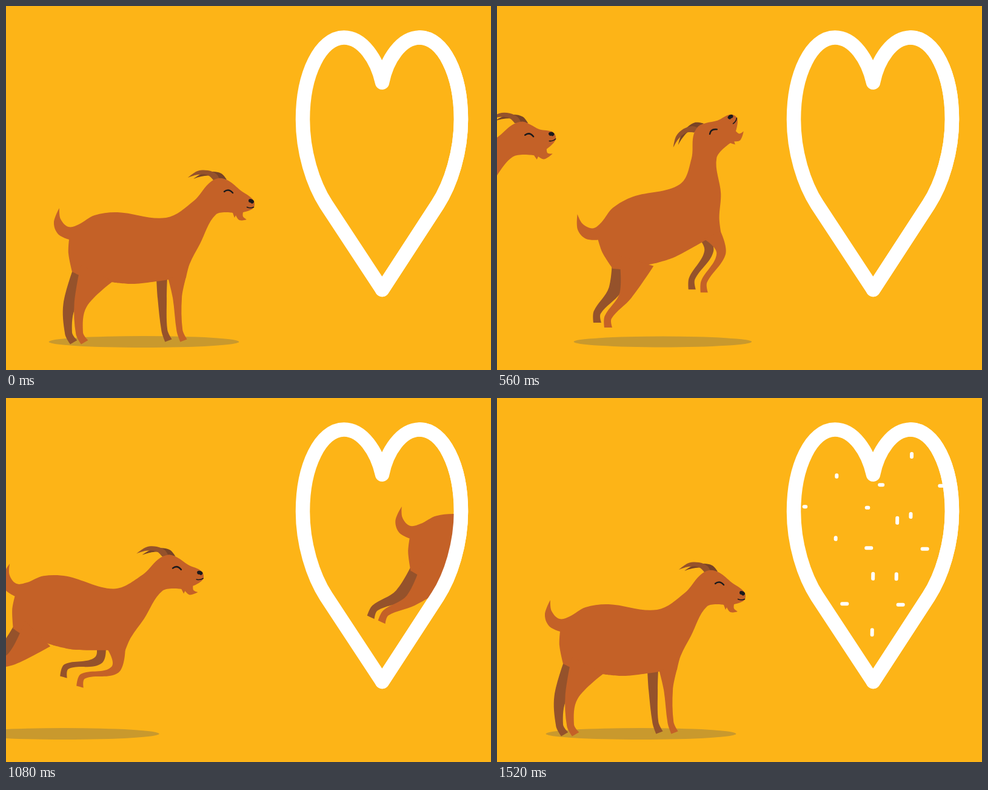
An HTML page with a canvas for the animation above (1560 ms loop, 800 by 600 pixels).

```html
<!DOCTYPE html>
<html lang="en">
<head>
<meta charset="utf-8">
<title>Goat leaping through a heart</title>
<style>
html, body { margin: 0; width: 100%; height: 100%; overflow: hidden; background: #fdb417; }
canvas { display: block; }
</style>
</head>
<body>
<canvas id="stage" width="800" height="600"></canvas>
<script>
const ctx = document.getElementById('stage').getContext('2d');
const LOOP = 1560, STEP = 40;
const COAT = '#c46127', SHADE = '#95522b', HORN = '#784326', INK = '#1b1a1c';

const lerp = (a, b, u) => a + (b - a) * u;
const clamp = u => Math.max(0, Math.min(1, u));
const ramp = (v, from, to) => {
  const u = clamp((v - from) / (to - from));
  return u * u * (3 - 2 * u);
};
// Half a cosine swing: 0 at rest, 2 after the given period
const swing = (t, period) => 1 - Math.cos(Math.PI * t / period);

// "x,y" is a smooth point, "x,y!" a corner
const points = text => text.trim().split(/\s+/).map(s => {
  const [x, y] = s.replace('!', '').split(',').map(Number);
  return { x, y, corner: s.endsWith('!') };
});

// The goat at rest; every other pose is this one bent
const torso = points(`88,333! 90,351 103,364 120,360 146,345 184,340 264,349 310,321 334,293
  350,284 367,288 387,304 408,320 408,333 391,340! 391,347 397,352! 385,353 379,345! 377,349!
  374,341! 346,344 320,392 303,425 297,448! 268,451! 212,458 180,456! 127,447! 109,438!
  103,408 104,385! 86,376 79,357`);
const farHorn = points('309,285! 322,277 340,273 355,276 364,286! 348,287! 338,280 322,281');
const nearHorn = points('300,283! 316,272 333,271 347,277 353,287! 342,287! 333,279 316,278');
const eyelid = points('360,306 367,300 374,308');
const nostril = points('403,321 405,321 406,322.5');
const mouth = points('397.5,331.5 403,334 408.5,331.5');
const [, eye] = eyelid, [nose] = nostril;

const legs = {
  front: { hip: { x: 282, y: 447 }, bones: [34, 54, 18], widths: [30, 15, 10, 12], farTop: 18 },
  hind: { hip: { x: 150, y: 440 }, bones: [60, 46, 17], widths: [60, 21, 12, 13], farTop: 45 }
};
// Thigh, shin and hoof angles, then the shift of the far leg
const stances = {
  stand: { front: [89, 86, 68, -25, 0], hind: [117, 92, 60, -18, 0] },
  run: { front: [85, 160, 97, -27, -16], hind: [127, 152, 110, -16, -10] },
  leap: { front: [86, 143, 111, -20, -5], hind: [129, 150, 111, -18, -8] }
};

// Negative times glide in to a landing, positive ones rear up and leap away
function motion(time) {
  if (time < 0) {
    const s = Math.max(0, -40 - time), x = -220 * swing(s, 1450);
    return {
      x, y: -75 * swing(s, 1200),
      body: .00033 * s, neck: -.00012 * s, head: -.00055 * s,
      stance: 'run', tuck: clamp(s / 160),
      shadowX: 237.5 + 1.53 * x, shadowR: 157
    };
  }
  const tuck = ramp(time, 0, 400), s = Math.max(0, time - 400);
  const leap = 307 * (Math.hypot(1, s / 260) - 1);
  return {
    x: 8 * tuck + leap, y: -18 * tuck - 65 * swing(s, 660),
    body: -.43 * tuck + .49 * (s / 680) ** 1.55, neck: -.22 * tuck, head: -.4 * tuck,
    stance: 'leap', tuck,
    shadowX: 227.5 + 2 * tuck + .82 * leap, shadowR: 157 - .19 * leap
  };
}

function turn(p, cx, cy, angle) {
  const c = Math.cos(angle), s = Math.sin(angle), x = p.x - cx, y = p.y - cy;
  return { x: cx + x * c - y * s, y: cy + x * s + y * c, corner: p.corner };
}

// Bends head, neck and body in turn; "at" makes a detail follow one spot rigidly
function bend(m, p, at = p) {
  p = turn(p, 352, 315, m.head * ramp(at.x, 345, 405));
  p = turn(p, 285, 385, m.neck * ramp(at.x - .7 * (at.y - 350), 240, 350));
  p = turn(p, 200, 400, m.body);
  return { x: p.x + m.x, y: p.y + m.y, corner: p.corner };
}

function trace(pts) {
  const path = new Path2D(), n = pts.length;
  const handle = (p, from, to, size) => {
    if (p.corner) return [p.x, p.y];
    const dx = to.x - from.x, dy = to.y - from.y, k = size / (Math.hypot(dx, dy) || 1);
    return [p.x + dx * k, p.y + dy * k];
  };
  path.moveTo(pts[0].x, pts[0].y);
  for (let i = 0; i < n; i++) {
    const a = pts[(i + n - 1) % n], b = pts[i], c = pts[(i + 1) % n], d = pts[(i + 2) % n];
    const size = Math.hypot(c.x - b.x, c.y - b.y) / 3;
    path.bezierCurveTo(...handle(b, a, c, size), ...handle(c, d, b, size), c.x, c.y);
  }
  path.closePath();
  return path;
}

function limb(hip, angles, bones, widths) {
  const left = [], right = [];
  let { x, y } = hip;
  widths.forEach((width, i) => {
    const before = angles[Math.max(0, i - 1)], after = angles[Math.min(i, bones.length - 1)];
    const across = (before + after) / 2 + Math.PI / 2;
    const dx = Math.cos(across) * width / 2, dy = Math.sin(across) * width / 2;
    const corner = i === 0 || i === bones.length;
    left.push({ x: x + dx, y: y + dy, corner });
    right.unshift({ x: x - dx, y: y - dy, corner });
    x += Math.cos(after) * bones[i];
    y += Math.sin(after) * bones[i];
  });
  return trace([...left, ...right]);
}

function fill(path, color) {
  ctx.fillStyle = color;
  ctx.fill(path);
}

function line(path, color, width) {
  ctx.strokeStyle = color;
  ctx.lineWidth = width;
  ctx.stroke(path);
}

function drawGoat(time) {
  const m = motion(time);
  const shape = (pts, color, at) => fill(trace(pts.map(p => bend(m, p, at))), color);
  const arc = (pts, at, width) => {
    const [a, b, c] = pts.map(p => bend(m, p, at)), path = new Path2D();
    path.moveTo(a.x, a.y);
    path.quadraticCurveTo(b.x, b.y, c.x, c.y);
    line(path, INK, width);
  };
  const leg = (name, isFar) => {
    const { hip, bones, widths, farTop } = legs[name];
    const pose = stances.stand[name].map((v, i) => lerp(v, stances[m.stance][name][i], m.tuck));
    const angles = pose.slice(0, 3).map(deg => deg * Math.PI / 180 + m.body);
    const top = bend(m, hip);
    if (!isFar) return fill(limb(top, angles, bones, widths), COAT);
    const shifted = { x: top.x + pose[3], y: top.y + pose[4] };
    fill(limb(shifted, angles, bones, [farTop, ...widths.slice(1)]), SHADE);
  };

  const shadow = new Path2D();
  shadow.ellipse(m.shadowX, 553.5, m.shadowR, m.shadowR * .0605, 0, 0, 7);
  fill(shadow, '#c9992d');
  leg('hind', true);
  leg('front', true);
  shape(farHorn, HORN, eye);
  shape(nearHorn, SHADE, eye);
  shape(torso, COAT);
  leg('hind');
  leg('front');
  arc(eyelid, eye, 2.4);
  arc(nostril, nose, 6);
  arc(mouth, nose, 1.6);
}

const rightSide = 'L712 327C734 293 750.5 240 750.5 187C750.5 112 721 52 682.5 52';
const heart = new Path2D('M620.5 126C612 88 588 52 557.5 52C519 52 489.5 112 489.5 187' +
  'C489.5 240 506 293 528 327L620.5 467.5' + rightSide + 'C652 52 628 88 620.5 126');
const heartFront = new Path2D('M620.5 467.5' + rightSide);
const opening = new Path2D('M0 0H672V58C706 58 741 112 741 187C741 240 723 293 700 327L517 600H0Z');

// x, y, start time
const sparks = [[559.5, 180, 1200], [683.3, 144, 1240], [659.5, 248, 1280], [619.5, 340, 1280]];
const reach = ms => 53 * (1 - (1 - clamp(ms / 360)) ** 2.7);

function drawSpark(x, y, age) {
  if (age <= 0) return;
  const path = new Path2D(), near = reach(age - 80), far = reach(age);
  for (let i = 0; i < 4; i++) {
    const angle = i * Math.PI / 2 + .016, c = Math.cos(angle), s = Math.sin(angle);
    path.moveTo(x + near * c, y + near * s);
    path.lineTo(x + far * c, y + far * s);
  }
  line(path, '#fff', 6);
}

function draw(t) {
  ctx.lineCap = ctx.lineJoin = 'round';
  ctx.fillStyle = '#fdb417';
  ctx.fillRect(0, 0, 800, 600);
  line(heart, '#fff', 23.5);
  ctx.save();
  ctx.clip(opening);
  drawGoat(t - LOOP);
  if (t < 1240) drawGoat(t);
  ctx.restore();
  for (const [x, y, start] of sparks) drawSpark(x, y, t - start);
  line(heartFront, '#fff', 23.5);
}

const begin = performance.now();
function tick() {
  const elapsed = performance.now() - begin;
  draw(Math.floor(elapsed % LOOP / STEP) * STEP);
  requestAnimationFrame(tick);
}
tick();
</script>
</body>
</html>
```
